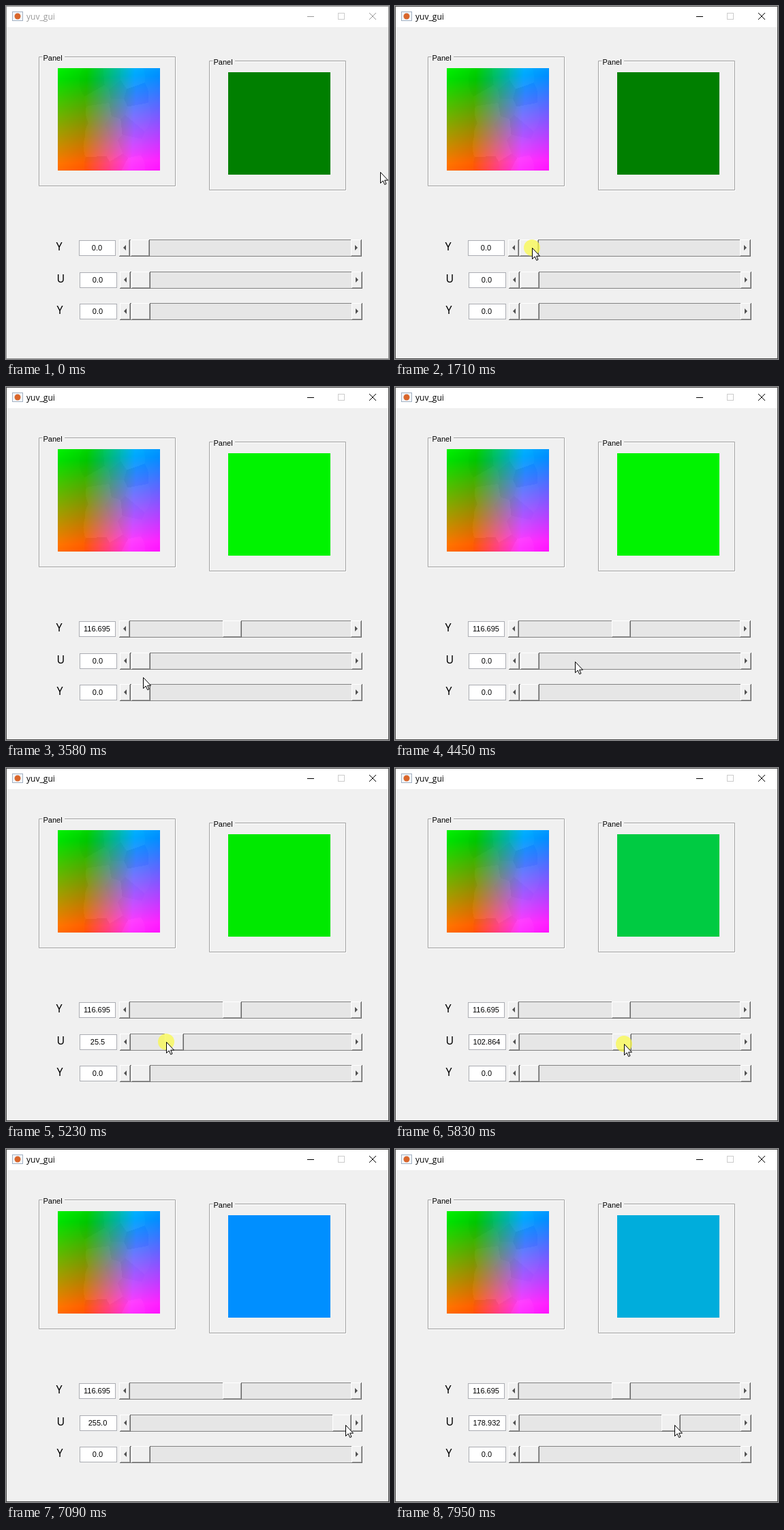
An HTML page with a canvas that plays this animation: 562x517 px, repeating every 8 s.

```html
<!DOCTYPE html>
<html lang="en">
<head>
<meta charset="utf-8">
<title>yuv_gui</title>
<style>
html, body { margin: 0; width: 100%; height: 100%; overflow: hidden; background: #f0f0f0; }
svg, canvas { position: absolute; left: 0; top: 0; }
canvas { left: 76px; top: 91px; }
text { font: 11px "Liberation Sans", Arial, sans-serif; }
.title { font: 12px "Open Sans", "Noto Sans", sans-serif; }
.label { font: 16px "Noto Sans", "Open Sans", sans-serif; }
.mid { text-anchor: middle; }
</style>
</head>
<body>
<svg id="stage" width="562" height="517"></svg>
<canvas id="plane" width="150" height="150"></canvas>
<svg id="top" width="562" height="517"></svg>
<script>
const $ = id => document.getElementById(id);
const set = (id, attr, value) => $(id).setAttribute(attr, value);
const STEP = 77.67, LOOP = 8000, TRAVEL = 295, Y = 0, U = 1;
const ROWS = [
  { name: "Y", x: 166, y: 342, box: 107, w: 54 },
  { name: "U", x: 167, y: 389, box: 108, w: 55 },
  { name: "Y", x: 167, y: 435, box: 108, w: 55 }
];

// Timeline in steps: the cursor moves, or a press drags a thumb along its track
const moves = [], drags = [];
const tip = { x: 549, y: 243 }, thumbs = [0, 0, 0];

function move(start, end, x, y) {
  moves.push({ start, end, from: { ...tip }, to: { x, y } });
  Object.assign(tip, { x, y });
}
function drag(start, end, row, to, carry = true) {
  const from = thumbs[row];
  drags.push({ start, end, row, from, to });
  if (carry) move(start, end, tip.x + to - from, tip.y);
  thumbs[row] = to;
}

move(9, 11, 504, 259);
move(13, 20, 201, 354);
drag(22, 26, Y, 33);
move(26, 28, 236, 354);
drag(28, 32, Y, 88);
move(32, 33, 284, 357);
drag(33, 38, Y, 135);
move(41, 44, 193, 437);
move(45, 46, 201, 425);
move(46, 50, 200, 402);
move(55, 58, 296, 402);
drag(59, 60, U, TRAVEL / 10, false);
move(61, 65, 215, 401);
drag(65, 67, U, 49);
drag(67, 70, U, 119);
move(70, 71, 298, 402);
move(72, 73, 320, 404);
drag(73, 78, U, 158);
drag(80, 82, U, 223);
drag(82, 84, U, 225);
drag(86, 89, U, TRAVEL);
move(90, 91, 498, 404);
drag(92, 94, U, 261);
drag(96, 101, U, 207);

const clamp = (v, lo, hi) => Math.max(lo, Math.min(hi, v));
const mix = (s, n, a, b) => a + (b - a) * clamp((n - s.start) / (s.end - s.start), 0, 1);

function cursorAt(n) {
  const s = moves.findLast(m => m.start <= n) || moves[0];
  return ["x", "y"].map(k => Math.round(mix(s, n, s.from[k], s.to[k])));
}
function thumbAt(row, n) {
  const s = drags.findLast(d => d.row === row && d.start <= n);
  return s ? Math.round(mix(s, n, s.from, s.to)) : 0;
}
// the value changes on release only; a drag that goes straight on is still held
function valueAt(row, n) {
  const s = drags.findLast(d => d.row === row && d.end <= n && !drags.some(e => e.start === d.end));
  return s ? s.to * 255 / TRAVEL : 0;
}
function format(value) {
  const v = +value.toPrecision(6);
  return Number.isInteger(v) ? v + ".0" : "" + v;
}
const toRgb = (y, u, v) => [
  y + 1.14 * (v - 128),
  y - 0.395 * (u - 128) - 0.594 * (v - 128),
  y + 2.032 * (u - 128)
].map(c => Math.round(clamp(c, 0, 255)));

const rect = (x, y, w, h, fill, more = "") =>
  `<rect x="${x}" y="${y}" width="${w}" height="${h}" fill="${fill}" ${more}/>`;
const line = (d, color, more = "") => `<path d="${d}" fill="none" stroke="${color}" ${more}/>`;

function raised(x, y, w, h) {
  return rect(x, y, w, h, "#696969") + rect(x, y, w - 1, h - 1, "#fff") +
    rect(x + 1, y + 1, w - 2, h - 2, "#a0a0a0") + rect(x + 1, y + 1, w - 3, h - 3, "#f0f0f0");
}
function panel(x, y) {
  const edge = (o, c) =>
    line(`M${x + 5 + o} ${y + o}H${x + o}v189h200v-189H${x + 38}`, c);
  return edge(1.5, "#fff") + edge(0.5, "#a0a0a0") + `<text x="${x + 6.5}" y="${y + 6}">Panel</text>`;
}
function slider({ name, x, y, box, w }, i) {
  const arrow = (ax, s) => `<path d="M${ax} ${y + 12}l${s * 4} -4v8z" fill="#505050"/>`;
  return `<text class="label" x="${x - 92.5}" y="${y + 16}">${name}</text>` +
    rect(box + .5, y + 1.5, w - 1, 22, "#fff", 'stroke="#abadb3"') +
    `<text class="mid" id="num${i}" x="${box + 26.5}" y="${y + 16}"></text>` +
    rect(x + 16, y, 324, 25, "#838383") + rect(x + 16, y + 1, 324, 23, "#e6e6e6") +
    raised(x, y, 16, 25) + raised(x + 340, y, 16, 25) + arrow(x + 6, 1) + arrow(x + 350, -1) +
    `<g id="thumb${i}">${raised(x + 17, y, 28, 25)}</g>`;
}

$("stage").innerHTML =
  rect(0, 0, 562, 517, "#f0f0f0") + rect(0, 0, 562, 31, "#fff") +
  rect(.5, .5, 561, 516, "none", 'id="frame"') +
  rect(9.5, 8.5, 15, 13, "#f2f5f9", 'stroke="#a3b1c2"') +
  '<circle cx="17" cy="15" r="4.5" fill="#d9662c"/>' +
  '<text class="title" id="title" x="30" y="20">yuv_gui</text>' +
  line("M442 15.5h10M533 10l10 10m0-10l-10 10", "#000", 'id="buttons"') +
  rect(487.5, 10.5, 9, 9, "none", 'stroke="#ccc"') +
  panel(48, 74) + panel(298, 80) +
  rect(326, 97, 150, 150, "#007f00", 'id="swatch"') +
  ROWS.map(slider).join("");

$("top").innerHTML =
  '<circle id="spot" r="12" fill="#fafa46" opacity=".72"/>' +
  '<path id="arrow" d="M.5.5V16.5L4.2 13L6.7 18.5L9 17.5L6.6 12.2H11.5Z" fill="#fff" stroke="#000"/>';

// Colour plane: U across, V down, with cells of uneven brightness along the middle
(function paintPlane() {
  let seed = 7;
  const rnd = () => (seed = seed * 16807 % 2147483647) / 2147483647;
  const cells = Array.from({ length: 18 }, (_, i) => ({
    x: 55 + i % 3 * 22 + rnd() * 14,
    y: Math.floor(i / 3) * 27 + rnd() * 20,
    shift: rnd() * 14 - 7
  }));
  const g = $("plane").getContext("2d"), img = g.createImageData(150, 150);
  for (let y = 0; y < 150; y++) for (let x = 0; x < 150; x++) {
    let best = 24 ** 2, shift = 0;
    for (const c of cells) {
      const d = (x - c.x) ** 2 + (y - c.y) ** 2 * .6;
      if (d < best) [best, shift] = [d, c.shift];
    }
    const luma = 114 + x / 15 + y / 8 + shift;
    img.data.set([...toRgb(luma, x * 1.7, y * 1.7), 255], (y * 150 + x) * 4);
  }
  g.putImageData(img, 0, 0);
})();

function draw(t) {
  const n = Math.floor((t + 12) / STEP), active = n >= 21;
  const ink = active ? "#000" : "#999";
  set("frame", "stroke", active ? "#484848" : "#8c8c8c");
  set("title", "fill", ink);
  set("buttons", "stroke", ink);

  const values = ROWS.map((_, row) => valueAt(row, n));
  values.forEach((value, row) => {
    $("num" + row).textContent = format(value);
    set("thumb" + row, "transform", `translate(${thumbAt(row, n)} 0)`);
  });
  set("swatch", "fill", `rgb(${toRgb(...values)})`);

  const at = `translate(${cursorAt(n)})`;
  set("arrow", "transform", at);
  set("spot", "transform", at);
  set("spot", "visibility", drags.some(d => n >= d.start && n < d.end) ? "visible" : "hidden");
}
function tick() {
  draw(performance.now() % LOOP);
  requestAnimationFrame(tick);
}
tick();
</script>
</body>
</html>
```
